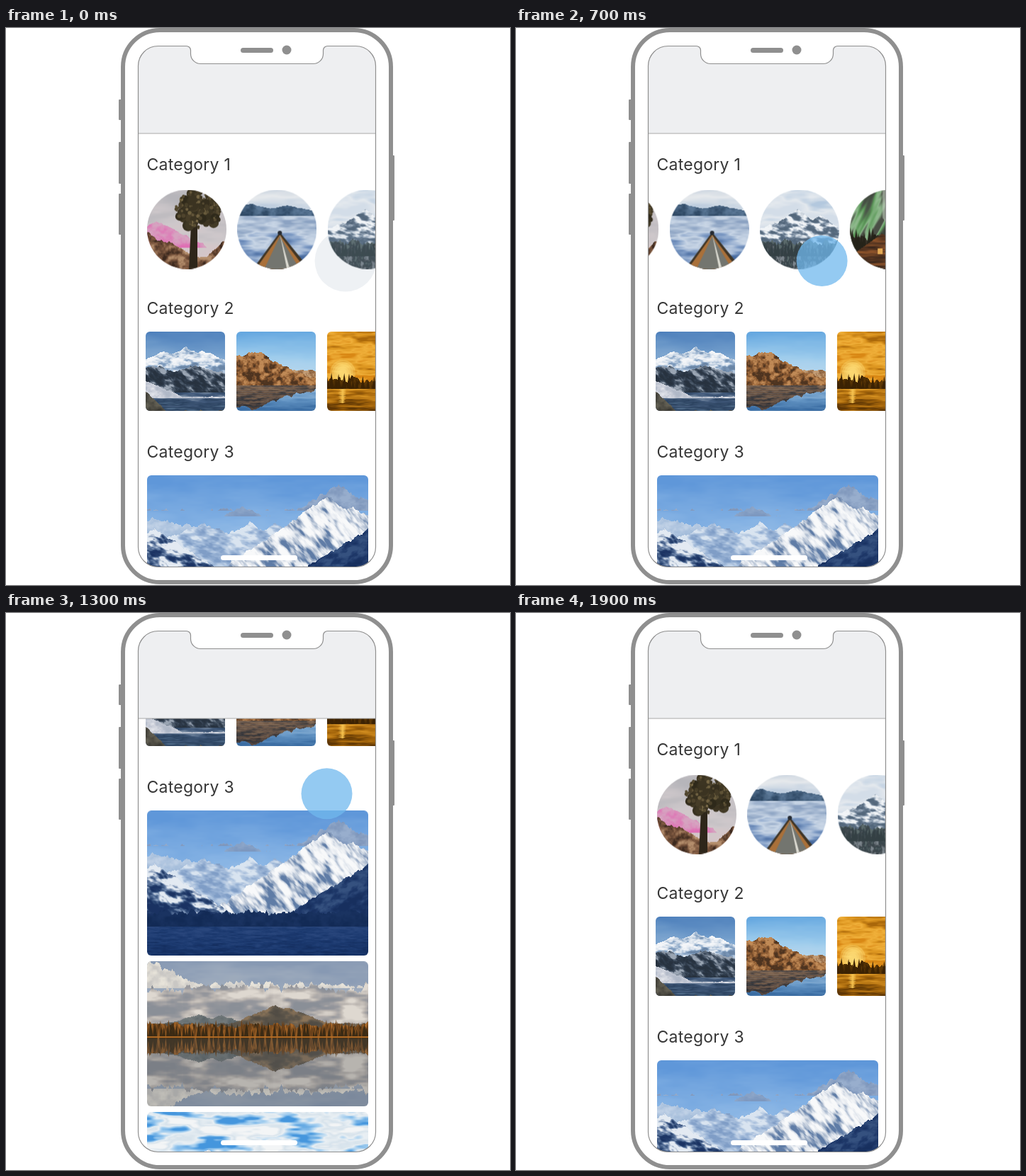
An HTML page with a canvas for the animation above (2 s loop, 711x787 px).

```html
<!DOCTYPE html>
<html lang="en">
<head>
<meta charset="utf-8">
<title>Category carousel</title>
<style>
html, body { margin: 0; width: 100%; height: 100%; overflow: hidden; background: #fff; }
canvas { display: block; width: 100%; height: 100%; }
</style>
</head>
<body>
<canvas id="stage" width="711" height="787"></canvas>
<script>
const ctx = document.getElementById('stage').getContext('2d');
const LOOP = 2000, STEP = 100, GREY = '#8f8f8f';
const lerp = (a, b, p) => a + (b - a) * p;
const clamp = v => Math.min(1, Math.max(0, v));
const ramp = (t, a, b) => clamp((t - a) / (b - a));
const ease = p => p * p * (3 - 2 * p);
const smooth = (t, a, b) => ease(ramp(t, a, b));

// ---- Seeded noise ----
let g, salt, draws;
function hash(x, y) {
  const n = Math.sin(x * 127.1 + y * 311.7 + salt * 17.3) * 43758.5453;
  return n - Math.floor(n);
}
const rnd = () => hash(draws++, .5);

function noise(x, y) {
  const ix = Math.floor(x), iy = Math.floor(y), u = ease(x - ix), v = ease(y - iy);
  return lerp(lerp(hash(ix, iy), hash(ix + 1, iy), u),
              lerp(hash(ix, iy + 1), hash(ix + 1, iy + 1), u), v);
}
const fbm = (x, y) => noise(x, y) * .55 + noise(x * 2, y * 2) * .28 + noise(x * 4, y * 4) * .17;

// ---- Painting helpers; they work on the picture being made ----
function picture(w, h, radius, scene, i) {
  const c = document.createElement('canvas');
  c.width = w;
  c.height = h;
  g = c.getContext('2d');
  salt = w + i;
  draws = 1;
  g.beginPath();
  g.roundRect(0, 0, w, h, radius);
  g.clip();
  scene();
  return c;
}

// Colour at v in 0..1 along a space-separated list of hex colours.
function palette(list) {
  const rgb = list.split(' ').map(c => [0, 8, 16].map(s => parseInt(c, 16) >> (16 - s) & 255));
  return v => {
    const p = clamp(v) * (rgb.length - 1), i = Math.min(rgb.length - 2, Math.floor(p));
    return `rgb(${rgb[i].map((a, k) => Math.round(lerp(a, rgb[i + 1][k], p - i)))})`;
  };
}

// Skyline from peaks of [x, y, slope].
const peaks = (base, ...tops) => x =>
  Math.min(base, ...tops.map(([px, py, slope]) => py + Math.abs(x - px) * slope));

// Grainy layer from a skyline down to a floor; shade runs the colours downwards.
function layer(list, top, floor, { sx = 10, sy = 8, lean = 0, rough = 0, shade = .3, contrast = 2 } = {}) {
  const color = palette(list);
  salt++;
  for (let x = 0; x < g.canvas.width; x++) {
    const y0 = (typeof top === 'function' ? top(x) : top) + (fbm(x / 7, 3) - .5) * rough;
    for (let y = Math.max(0, Math.round(y0)); y < floor; y++) {
      const depth = (y - y0) / (floor - y0);
      const grain = fbm((x + lean * y) / sx, y / sy) - .5;
      g.fillStyle = color(.5 + grain * contrast + (depth - .5) * shade);
      g.fillRect(x, y, 1, 1);
    }
  }
}

const sky = (list, floor, look) => layer(list, 0, floor, { sx: 50, sy: 14, shade: .8, contrast: .8, ...look });
const water = (list, top, floor, look) => layer(list, top, floor, { sx: 22, sy: 3, shade: .6, contrast: 1.2, ...look });

function poly(color, ...p) {
  g.fillStyle = color;
  g.beginPath();
  for (let i = 0; i < p.length; i += 2) g.lineTo(p[i], p[i + 1]);
  g.fill();
}

function disc(color, x, y, r) {
  g.fillStyle = color;
  g.beginPath();
  g.arc(x, y, r, 0, 7);
  g.fill();
}

// Discs scattered in an oval.
function leaves(list, count, x, y, rx, ry, size) {
  const color = palette(list);
  for (let i = 0; i < count; i++) {
    const a = rnd() * 6.28, d = Math.sqrt(rnd());
    disc(color(rnd()), x + Math.cos(a) * d * rx, y + Math.sin(a) * d * ry, size * (.4 + rnd()));
  }
}

function firs(color, x0, x1, base, h, gap) {
  for (let x = x0; x < x1; x += gap * (.5 + rnd())) {
    const t = h * (.5 + rnd() * .5), w = t * .13 + .6;
    poly(color, x - w, base, x, base - t, x + w, base);
  }
}

// ---- Round pictures ----
function desertTree() {
  sky('b6b5ba cdc7ca d8c6c8', 112);
  layer('d6a3c0 df6fb4', peaks(82, [12, 44, .5]), 82, { rough: 6 });
  layer('b48e6c 7b563e 3c291e', peaks(94, [0, 60, .7], [30, 72, .6], [112, 68, .9]), 112, { sx: 8, rough: 8 });
  poly('#2e261a', 59, 112, 62, 50, 71, 50, 71, 112);
  leaves('2b2618 4a402a', 65, 74, 28, 33, 26, 6);
  leaves('3a3220 7d6d49', 90, 74, 28, 34, 27, 2);
}

function boatLake() {
  sky('c9d3df e6e9ec b9cadd', 28);
  layer('5b7897 304a66', peaks(30, [15, 20, .2], [70, 22, .2]), 38, { rough: 3 });
  water('8ba2c2 c9d6e6 7d9ac4 46699e', 37, 112, { sx: 35, sy: 9, shade: .9 });
  poly('#3e3527', 60, 60, 22, 112, 102, 112);
  poly('#a9703a', 60, 64, 26, 112, 96, 112);
  poly('#73756f', 60, 66, 38, 112, 88, 112);
  poly('#dddcd3', 60, 62, 70, 112, 74, 112);
  disc('#252a32', 60, 61, 3);
}

function snowPeak() {
  sky('b3c8de e4e9ee d3dde8', 75, { contrast: 2.2 });
  layer('f1f4f7 a3b2c2 62758a 53677b', peaks(62, [53, 28, .7], [85, 36, .7], [20, 46, .5]), 90,
    { sy: 5, lean: -.8, rough: 5, contrast: 3 });
  layer('5b6a6b 37444a 414a4f 7b848b', 74, 112, { sx: 4, rough: 14, shade: .7 });
  firs('#344044', 0, 112, 94, 22, 4);
}

function aurora() {
  layer('3a3f38 4b5749 5d9a5a 8fb98d 4a4f46', 0, 112, { sx: 16, sy: 70, lean: .5, contrast: 2.6, shade: 0 });
  poly('rgba(200,213,197,.55)', 46, 0, 58, 0, 62, 60, 46, 40);
  layer('3b342a 211d16', 68, 112, { rough: 16, sx: 4 });
  firs('#252319', 0, 112, 84, 32, 5);
  layer('8b522a 573621 33231a', peaks(112, [45, 62, .7], [85, 67, .6]), 112, { sx: 30, sy: 3 });
  poly('#e3aa55', 39, 83, 46, 83, 46, 91, 39, 91);
}

function pinkDusk() {
  sky('dd8798 e094a4 d0709f be679b', 90, { sx: 40, sy: 6, contrast: 1.6 });
  layer('62648c 343954', peaks(92, [70, 72, .5], [98, 74, .5]), 92, { rough: 4 });
  layer('2b2e44 22253a', x => Math.max(59, peaks(90, [19, 46, .9])(x)), 92, { rough: 3 });
  water('4a3a3c 8d6557 5b3f36', 89, 112);
  poly('#281d22', 54, 102, 60, 97, 67, 103, 60, 105);
}

function iceLake() {
  sky('5f92c4 b2cbe2', 30);
  layer('f0f3f6 b9c8d8 6f8ba9 3c5672', peaks(24, [55, 7, .5], [20, 11, .4], [108, 10, .5]), 52,
    { sy: 5, rough: 5, shade: .8 });
  water('3d6492 203e6b 27466f', 45, 92);
  layer('eef1f4 d0dae4 9db0c6', peaks(88, [0, 46, 1.4]), 112, { rough: 5 });
}

// ---- Square pictures ----
function glacier() {
  sky('4a7dba 6f9bca 9dbcda', 50, { contrast: .3 });
  layer('f3f5f8 d3deea 8aa6c6 6b86a6', peaks(40, [57, 22, .5], [25, 28, .4], [82, 27, .4]), 62,
    { sy: 5, rough: 5, shade: .6 });
  layer('9aa5b3 4c5a6b 2e3b4b 27323f', peaks(56, [12, 48, .3], [70, 47, .3]), 90,
    { sx: 8, lean: -.7, rough: 8, contrast: 2.6 });
  water('8496ab 41597a 2c4360 4c6785', 86, 112);
  layer('e2e4ea c3c8d4 aeb7c6', peaks(92, [0, 70, .42]), 94, { rough: 3 });
  layer('615e52 3b3a34', peaks(112, [0, 84, 1]), 112, { rough: 5 });
}

function autumnLake() {
  sky('66a8e0 9ccbec d3e3ef', 75, { contrast: .2, shade: 1 });
  layer('c39d76 a0754f 87603f', 54, 76, { rough: 5, sx: 4, sy: 4 });
  water('a9c6e0 6596c5 3a6ca2', 75, 112, { contrast: .5, shade: 1 });
  layer('c08a56 8e5c33 4e3420', peaks(78, [25, 27, .5], [0, 33, .3], [45, 36, 1.9]), 76,
    { sx: 6, sy: 6, rough: 9, contrast: 2.6 });
  g.save();
  g.translate(0, 152);
  g.scale(1, -.75);
  g.translate(0, 25);
  layer('2d2119 5b3b24 7a5230', peaks(76, [25, 30, .6], [0, 34, .3]), 76, { sx: 8, sy: 3, rough: 9 });
  g.restore();
}

function sunset() {
  sky('a9670a dd9620 f0b03a d98815', 80, { sx: 30, sy: 7, contrast: 1.8 });
  for (let r = 18; r > 3; r -= 3) disc('rgba(255,228,130,.3)', 22, 58, r);
  water('e09a26 a5660b 5e3604', 79, 112);
  for (let y = 81; y < 100; y += 2) poly('#f6c350', 15 + rnd() * 4, y, 28 - rnd() * 4, y, 22, y + 2);
  layer('5d3806 3b2203', 68, 81, { rough: 18, sx: 4 });
  firs('#3b2203', 0, 112, 80, 22, 6);
}

// ---- Wide pictures ----
function alpineLake() {
  sky('5f97d9 86b3e4 b3cde9', 140, { contrast: .3, shade: 1 });
  layer('98aecd 7d95ba', peaks(50, [270, 12, .6]), 50, { rough: 14 });
  layer('8fa8ca 7d98bf', peaks(60, [135, 46, .45]), 58, { rough: 8 });
  layer('c0d1e6 a3bcda', peaks(84, [10, 60, .22]), 90, { rough: 10 });
  layer('d9e4f0 a3bbda 7f9dc6', peaks(88, [80, 70, .4], [145, 67, .5], [180, 70, .3]), 145,
    { sx: 14, lean: -.6, rough: 10, contrast: 2.4 });
  layer('f8f9fa e2e7ee a9b8cd 5f7ca6', peaks(150, [253, 31, .69], [290, 45, .6]), 150,
    { sx: 9, sy: 16, lean: -.7, rough: 9, shade: .6, contrast: 2.6 });
  layer('e3eaf2 7189ad 2b4673 1a3262', peaks(150, [10, 77, .62]), 150,
    { sx: 12, sy: 9, lean: -.6, rough: 8, shade: .8, contrast: 2.8 });
  layer('35517f 1f396a 172f5e', peaks(150, [318, 72, .62]), 150, { lean: .6, rough: 8, shade: .7 });
  layer('1a3361 122a55', 143, 166, { rough: 14 });
  water('2a477d 1c3a70 142e5f', 164, 205, { sx: 12, sy: 2 });
}

function mirrorLake() {
  sky('8799b3 9aa8bb a9b2bd', 70);
  layer('e8e4da c9c7c4', peaks(34, [0, -2, .5]), 38, { rough: 18 });
  layer('ded8d0 bcb6b1 97989d 8a8f97', 37, 109, { sx: 36, sy: 12, rough: 22, shade: .6, contrast: 2.4 });
  layer('737a7b 5a6467', peaks(92, [72, 76, .3], [105, 77, .3], [30, 86, .2]), 100, { rough: 4 });
  layer('8a7358 5f574b 514c44', peaks(88, [180, 62, .43], [197, 65, .4]), 100, { sx: 14, rough: 4 });
  layer('a5672a 70451c 3a2a14', 90, 109, { sx: 3, sy: 10, rough: 12, contrast: 2.6 });
  firs('#6b421b', 0, 312, 109, 27, 4);
  firs('#8f5822', 0, 312, 109, 20, 5);
  firs('#3a2a14', 0, 312, 109, 24, 6);
  g.save();
  g.translate(0, 218);
  g.scale(1, -1);
  g.drawImage(g.canvas, 0, 0, 312, 109, 0, 0, 312, 109);
  g.restore();
  g.fillStyle = 'rgba(84,86,92,.28)';
  g.fillRect(0, 109, 312, 96);
  g.fillStyle = '#b56d26';
  g.fillRect(0, 106, 312, 2);
}

function snowyRange() {
  sky('4596dd 9ac9ee eaf0f4 d7e3ec f3f5f6', 75, { sx: 44, sy: 12, shade: .1, contrast: 2.6 });
  layer('f3f5f7 b4c2d1 5d7795 304a6a 263b55',
    peaks(66, [87, 54, .5], [18, 56, .4], [155, 61, .4], [214, 60, .4], [275, 55, .4]), 125,
    { sx: 11, sy: 8, lean: -.6, rough: 10, shade: 1, contrast: 2.6 });
  layer('33494d 22302f', 104, 205, { rough: 14, sx: 4 });
  firs('#253330', 0, 312, 112, 16, 7);
  firs('#1f2c2b', 40, 312, 125, 46, 42);
}

const gallery = (w, h, radius, scenes) => scenes.map((s, i) => picture(w, h, radius, s, i));
const rounds = gallery(112, 112, 56, [desertTree, boatLake, snowPeak, aurora, pinkDusk, iceLake]);
const squares = gallery(112, 112, 6, [glacier, autumnLake, sunset]);
const wides = gallery(312, 205, 6, [alpineLake, mirrorLake, snowyRange]);

// ---- Phone ----
const L = 186.5, R = 521.5, T = 25.5, B = 761.5, NL = 260.5, NR = 447.5, NB = 50.5;
const corners = [[L, T, 28], [NL, T, 6], [NL, NB, 14], [NR, NB, 14], [NR, T, 6], [R, T, 28], [R, B, 28], [L, B, 28]];
const screen = new Path2D();
screen.moveTo(L, 100);
corners.forEach(([x, y, r], i) => {
  const [nx, ny] = corners[(i + 1) % corners.length];
  screen.arcTo(x, y, nx, ny, r);
});
screen.closePath();

function pill(color, x, y, w, h, r = h / 2) {
  ctx.fillStyle = color;
  ctx.beginPath();
  ctx.roundRect(x, y, w, h, r);
  ctx.fill();
}

function drawBody() {
  pill(GREY, 159, 101, 5, 29, 1);
  pill(GREY, 159, 161, 5, 59, 1);
  pill(GREY, 159, 234, 5, 58, 1);
  pill(GREY, 543, 180, 5, 92, 1);
  ctx.strokeStyle = GREY;
  ctx.lineWidth = 6;
  ctx.beginPath();
  ctx.roundRect(165, 3, 378, 780, 52);
  ctx.stroke();
  pill(GREY, 331, 28, 46, 7);
  pill(GREY, 389.5, 24.5, 13, 13);
}

function drawContent(x, y) {
  ctx.save();
  ctx.beginPath();
  ctx.rect(186, 149, 336, 614);
  ctx.clip();
  ctx.translate(0, -y);
  ctx.font = '23px Inter, sans-serif';
  ctx.letterSpacing = '0.25px';
  ctx.fillStyle = '#363636';
  for (let i = 0; i < 3; i++) ctx.fillText('Category ' + (i + 1), 198.5, 201 + 203 * i);
  rounds.forEach((p, i) => ctx.drawImage(p, 199 + 127.3 * i - x, 228.5));
  squares.forEach((p, i) => ctx.drawImage(p, 197 + 128 * i, 429));
  wides.forEach((p, i) => ctx.drawImage(p, 199, 632 + 213 * i));
  ctx.restore();
}

function drawTouch(x, y, press) {
  if (press <= 0) return;
  const [r, b] = [lerp(130, 112, press), lerp(155, 238, press)];
  ctx.fillStyle = `rgba(${r},${lerp(140, 184, press)},${b},${.75 * press})`;
  ctx.beginPath();
  ctx.arc(x, y, lerp(45, 36, press), 0, 7);
  ctx.fill();
}

function draw(t) {
  const x = 408 * (smooth(t, 0, 350) - smooth(t, 425, 842));
  const y = 408 * (smooth(t, 1050, 1375) - smooth(t, 1500, 1830));
  ctx.fillStyle = '#fff';
  ctx.fillRect(0, 0, 711, 787);
  drawBody();

  ctx.save();
  ctx.clip(screen);
  drawContent(x, y);
  ctx.fillStyle = '#eeeff1';
  ctx.fillRect(186, 25, 336, 124);
  ctx.fillStyle = '#a9a9a9';
  ctx.fillRect(186, 148.5, 336, 1);
  pill('#fff', 303, 745, 108, 7);
  const swipe = ramp(t, -17, 83) - ramp(t, 840, 950);
  const drag = ramp(t, 1000, 1080) - ramp(t, 1810, 1890);
  drawTouch(t < 400 ? 479 - .554 * x : 498 - .605 * x, 329, swipe);
  drawTouch(452.5, 608 - y, drag);
  ctx.restore();

  ctx.strokeStyle = GREY;
  ctx.lineWidth = 1.2;
  ctx.stroke(screen);
}

const start = performance.now();
function tick() {
  const t = (performance.now() - start) % LOOP;
  draw(Math.floor(t / STEP) * STEP);
  requestAnimationFrame(tick);
}
tick();
</script>
</body>
</html>
```
